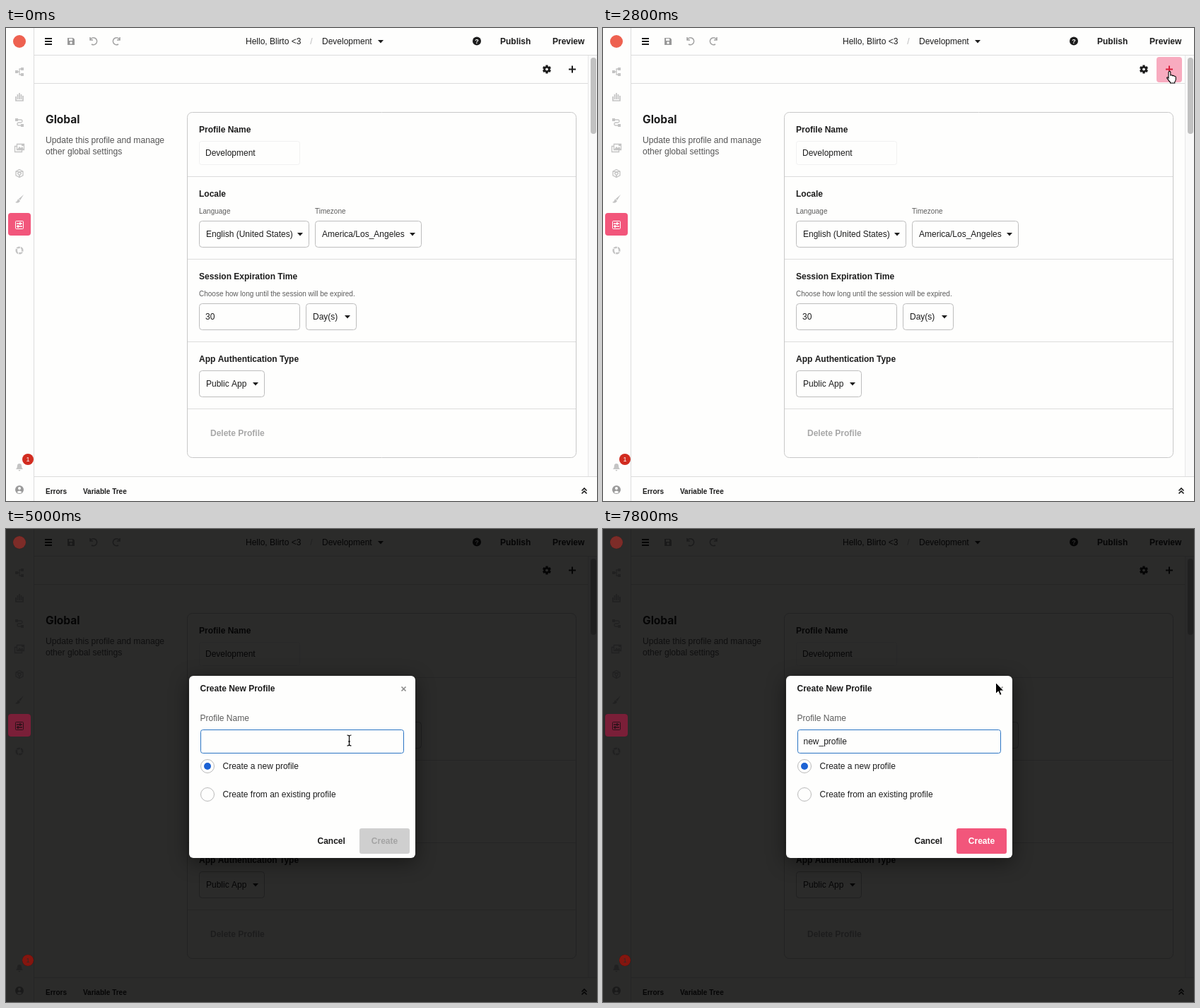
An HTML page with a canvas for the animation above (8000 ms loop, 836 px wide and 670 px high).

```html
<!DOCTYPE html>
<html lang="en">
<head>
<meta charset="utf-8">
<title>Create a profile</title>
<style>
  html, body { margin: 0; width: 100%; height: 100%; overflow: hidden; background: #fefefd; }
  canvas { display: block; }
</style>
</head>
<body>
<canvas id="stage" width="836" height="670"></canvas>
<script>
const ctx = document.getElementById('stage').getContext('2d');
const LOOP = 8000, STEP = 200;
const SANS = '"Liberation Sans", Arial, sans-serif';
const INK = '#1c1c1c', PAPER = '#fefefd', PINK = '#f2567b', FAINT = '#c4c4c4', LINE = '#dcdcdc';

// y is the vertical middle of the capitals
function text(str, x, y, { size = 12, bold = false, color = INK, align = 'left', font = SANS } = {}) {
  ctx.font = `${bold ? 'bold ' : ''}${size}px ${font}`;
  ctx.textAlign = align;
  ctx.fillStyle = color;
  ctx.fillText(str, x, Math.round(y + size * 0.35));
}

function rect(x, y, w, h, color) {
  ctx.fillStyle = color;
  ctx.fillRect(x, y, w, h);
}

function box(x, y, w, h, r, fill, stroke) {
  ctx.beginPath();
  if (stroke) ctx.roundRect(x + 0.5, y + 0.5, w - 1, h - 1, r);
  else ctx.roundRect(x, y, w, h, r);
  if (fill) { ctx.fillStyle = fill; ctx.fill(); }
  if (stroke) { ctx.strokeStyle = stroke; ctx.lineWidth = 1; ctx.stroke(); }
}

function disc(x, y, r, fill, stroke, width = 1) {
  ctx.beginPath();
  ctx.arc(x, y, r, 0, Math.PI * 2);
  if (fill) { ctx.fillStyle = fill; ctx.fill(); }
  if (stroke) { ctx.strokeStyle = stroke; ctx.lineWidth = width; ctx.stroke(); }
}

function path(d, x, y, { fill, stroke, width = 1 } = {}) {
  const p = new Path2D(d);
  ctx.save();
  ctx.translate(x, y);
  if (fill) { ctx.fillStyle = fill; ctx.fill(p); }
  if (stroke) { ctx.strokeStyle = stroke; ctx.lineWidth = width; ctx.stroke(p); }
  ctx.restore();
}

const triangle = (x, y) => path('M-4-2H4L0 2.4Z', x, y, { fill: INK });

function select(label, x, y, w) {
  box(x, y, w, 38, 4, PAPER, '#bdbdbd');
  text(label, x + 10, y + 19);
  triangle(x + w - 13, y + 19);
}

function gear(x, y) {
  for (let i = 0; i < 6; i++) {
    ctx.save();
    ctx.translate(x, y);
    ctx.rotate(i * Math.PI / 3);
    rect(-1.6, -6, 3.2, 4, INK);
    ctx.restore();
  }
  disc(x, y, 3.3, null, INK, 2.6);
}

function plus(x, y, color) {
  rect(x - 5, y - 1, 10, 2, color);
  rect(x - 1, y - 5, 2, 10, color);
}

function sideIcons() {
  const line = { stroke: FAINT, width: 1.3 }, solid = { fill: FAINT };
  // tree
  path('M-3 0H0M4-4H0V4H4', 19, 62, line);
  path('M-6-2h4v4h-4ZM2-6h4v4h-4ZM2 2h4v4h-4Z', 19, 62, solid);
  // bars
  path('M-5-1V5H5V-2M-2.5 3V-4M0 3V-6M2.5 3V-4', 19, 98, { stroke: FAINT, width: 1.7 });
  // route
  path('M-3-4H2a2 2 0 0 1 0 4H-1a2 2 0 0 0 0 4H4', 19, 134, line);
  path('M-6-6h4v4h-4ZM2 2h4v4h-4Z', 19, 134, solid);
  // pictures
  path('M-4-2.5H-6.5V5.5H3.5V3M-3.5-5.5H6.5V2.5H-3.5Z', 19, 170, line);
  path('M-3 2L0-2 2 0 4-2 6 2ZM3-5h3v2h-3Z', 19, 170, solid);
  // cube
  path('M0-5.5L5-2.8V2.8L0 5.5-5 2.8V-2.8ZM0-2L2.5 0 0 3-2.5 0ZM-5-2.8L0-2 5-2.8M0 3V5.5', 19, 206, line);
  // brush
  path('M6-6L1 2-1 0ZM-2 0L1 3Q-1 7-6 5-3 4-2 0Z', 19, 242, solid);
  // aperture
  disc(19, 315, 4.3, null, FAINT, 2.6);
  path('M-5-3L0-1M1-6L2 0M5 2L0 2M-1 6L-2 1', 19, 315, { stroke: PAPER, width: 1 });
  // bell
  path('M-5 3Q-3 1-3-2-3-5 0-5 3-5 3-2 3 1 5 3ZM-1.5 4h3Q0 7-1.5 4Z', 19, 622, solid);
  // account
  disc(19, 654, 6, '#9a9a9a');
  disc(19, 652, 2, PAPER);
  path('M-3.5 3Q0-1 3.5 3 0 6-3.5 3Z', 19, 654.5, { fill: PAPER });
}

// the parts that keep some colour behind the dialog
function accents(dim) {
  disc(19, 19, 9, dim ? '#7d2c28' : '#ee6150');
  box(3, 262, 32, 32, 4, dim ? '#7a1f38' : PINK);
  const mark = dim ? '#2b1219' : '#fff';
  box(13, 273, 12, 12, 1, null, mark);
  path('M-4-2H4M-4 2H4', 19, 279, { stroke: mark, width: 1.3 });
  path('M1-4V0M-2 0V4', 19, 279, { stroke: mark, width: 1.6 });
  disc(31, 611, 8, dim ? '#84160f' : '#d22c20');
  text('1', 31, 611, { size: 9, color: dim ? '#2b2b2a' : '#fff', align: 'center' });
}

function topBar() {
  for (const y of [14, 18, 22]) rect(55, y, 10, 2, INK);
  path('M-5-5H3L5-3V5H-5Z', 92, 19, { fill: '#999' });
  rect(89, 15, 5, 3, PAPER);
  disc(92, 21, 1.7, PAPER);
  const arc = 'M-5-6V-2H-1M-5-2A5 5 0 1 1-3 4';
  path(arc, 124, 19, { stroke: '#a2a2a2', width: 1.5 });
  ctx.save();
  ctx.translate(156, 19);
  ctx.scale(-1, 1);
  path(arc, 0, 0, { stroke: '#a2a2a2', width: 1.5 });
  ctx.restore();
  text('Hello, Blirto <3', 339, 19);
  text('/', 432, 19, { color: '#bbb', align: 'center' });
  text('Development', 447, 19);
  triangle(530, 19);
  disc(666, 18.5, 6, INK);
  text('?', 666, 18.5, { size: 9, bold: true, color: PAPER, align: 'center' });
  text('Publish', 699, 19, { bold: true });
  text('Preview', 773, 19, { bold: true });
  gear(765, 58.5);
}

function page(t) {
  rect(0, 0, 836, 670, PAPER);
  rect(823, 39, 13, 596, '#f9f9f9');
  rect(823, 39, 1, 596, '#e8e8e8');
  box(827, 42, 8, 108, 4, '#c1c1c1');
  rect(39, 0, 1, 670, LINE);
  for (const [y, end] of [[38, 836], [78, 823], [635, 836]]) rect(40, y, end - 40, 1, LINE);
  sideIcons();
  topBar();

  const hover = t >= 2400 && t < 3000;
  if (hover) box(783, 41, 36, 36, 4, t < 2600 ? '#fbd0db' : '#f8abbf');
  plus(801, 58.5, hover ? '#d81f3c' : INK);

  text('Global', 56, 130, { size: 15.5, bold: true, font: 'Inter, sans-serif' });
  text('Update this profile and manage', 56, 159, { size: 12.1, color: '#555' });
  text('other global settings', 56, 175, { size: 12.1, color: '#555' });

  box(256, 119, 551, 490, 7, null, '#c8c8c8');
  for (const y of [210, 327, 444, 539]) rect(257, y, 549, 1, LINE);
  const heads = [['Profile Name', 144], ['Locale', 235], ['Session Expiration Time', 352], ['App Authentication Type', 469]];
  for (const [s, y] of heads) text(s, 273, y, { bold: true });
  const small = { size: 10, color: '#5c5c5c' };
  text('Language', 273, 259, small);
  text('Timezone', 437, 259, small);
  text('Choose how long until the session will be expired.', 273, 376, small);
  box(273, 160, 143, 34, 3, null, '#f1f1f1');
  text('Development', 282, 177);
  select('English (United States)', 273, 273, 156);
  select('America/Los_Angeles', 437, 273, 151);
  box(273, 390, 143, 38, 4, PAPER, '#bdbdbd');
  text('30', 282, 409);
  select('Day(s)', 424, 390, 72);
  select('Public App', 273, 485, 93);
  text('Delete Profile', 289, 574, { bold: true, color: '#a8a8a8' });

  text('Errors', 56, 656, { size: 10, bold: true });
  text('Variable Tree', 109, 656, { size: 10, bold: true });
  path('M-3.5 0L0-3.5 3.5 0M-3.5 4L0 .5 3.5 4', 818, 655.5, { stroke: INK, width: 1.6 });
  accents(false);
}

function typed(t) {
  if (t < 5400) return '';
  const lengths = [1, 3, 4, 4, 5, 6, 8, 9, 11];
  return 'new_profile'.slice(0, lengths[Math.min((t - 5400) / STEP, 8)]);
}

function radio(label, y, on) {
  disc(285, y, 9.5, PAPER, '#b9b9b9');
  if (on) disc(285, y, 5, '#1c62d4');
  text(label, 306.5, y);
}

function dialog(t) {
  rect(0, 0, 836, 670, 'rgba(0,0,0,.83)');
  accents(true);
  ctx.save();
  ctx.shadowColor = 'rgba(0,0,0,.45)';
  ctx.shadowBlur = 28;
  ctx.shadowOffsetY = 6;
  box(259, 208, 320, 258, 6, PAPER);
  ctx.restore();

  text('Create New Profile', 274.5, 226, { bold: true });
  path('M-3-3L3 3M3-3L-3 3', 562.5, 226.5, { stroke: '#8c8c8c', width: 1.7 });
  text('Profile Name', 274.5, 268, { color: '#5c5c5c' });
  box(275, 284, 288, 34, 3, PAPER, t >= 4600 ? '#2a74c4' : '#bfbfbf');

  const value = typed(t);
  text(value, 283.5, 301);
  const caret = (t >= 4600 && t < 5000) || (t >= 5400 && t < 7600);
  if (caret) rect(Math.round(283 + ctx.measureText(value).width), 294, 1, 14, INK);

  radio('Create a new profile', 336, true);
  radio('Create from an existing profile', 376, false);
  text('Cancel', 440.5, 442, { bold: true });
  box(500, 424, 71, 36, 3, value ? PINK : '#cfcfcf');
  text('Create', 535.5, 442, { bold: true, color: value ? '#fff' : '#a4a4a4', align: 'center' });
}

const arrow = (x, y) =>
  path('M0 0V16L3.7 12.6 6 18 8.6 16.9 6.3 11.6H11.3Z', x, y, { fill: '#000', stroke: '#fff' });
const hand = (x, y) =>
  path('M3 10V1.8a1.4 1.4 0 0 1 2.8 0V6q2.6-.8 2.7.6 2.3-.6 2.6.7 2.2-.3 2.2 1.7v3q-.4 2-1.6 3.5v1.5H5.5v-1Q3.5 14 .6 9.6q.6-1.9 2.4.4Z',
    x, y, { fill: '#fff', stroke: '#000', width: 1.1 });
const beam = (x, y) => {
  const d = 'M-3-7.5Q0-7.5 0-5.5 0-7.5 3-7.5M0-6V6M-3 7.5Q0 7.5 0 5.5 0 7.5 3 7.5M-1.5 1.5H1.5';
  path(d, x, y, { stroke: '#fff', width: 3 });
  path(d, x, y, { stroke: '#000', width: 1.2 });
};

const mix = (a, b, u) => a + (b - a) * u;
const smooth = u => u * u * (3 - 2 * u);

function pointer(t) {
  if (t < 1400) return;
  if (t < 2400) {
    const u = Math.min((t - 1400) / 400, 1), left = (1 - u) ** 2;
    arrow(mix(798.5, 730, left), mix(55, 170, left));
  } else if (t < 3000) {
    hand(797, 61);
  } else if (t < 4400) {
    const u = smooth(Math.max(0, (t - 3400) / 1000));
    arrow(mix(798.5, 485, u), mix(59, 299, u));
  } else if (t < 5400) {
    beam(485.5, 299.5);
  } else if (t >= 7200) {
    const u = (t - 7200) / 600;
    arrow(mix(530, 555.5, u), mix(352, 217.5, u));
  }
}

function draw(now) {
  const t = Math.floor((now % LOOP) / STEP) * STEP;
  page(t);
  if (t >= 3000) dialog(t);
  pointer(t);
}

const start = performance.now();
function tick() {
  draw(performance.now() - start);
  requestAnimationFrame(tick);
}
tick();
</script>
</body>
</html>
```
